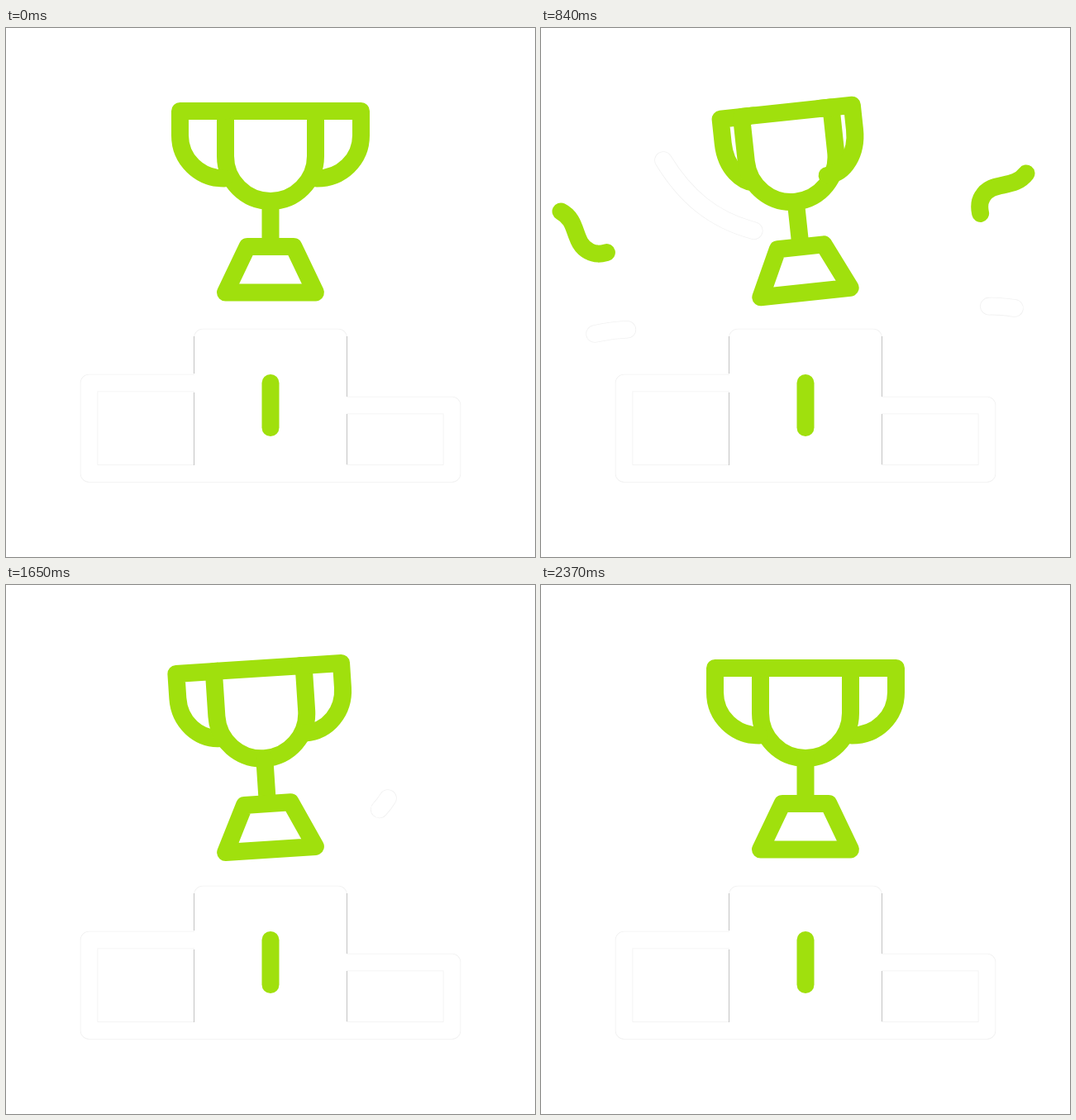
Recreate the animation shown at these times as an HTML page. Size 640 px wide and 640 px high, loop 2.4 s.

```html
<!DOCTYPE html>
<html lang="en">
<head>
<meta charset="utf-8">
<title>Trophy podium</title>
<style>
  html, body { margin: 0; height: 100%; overflow: hidden; background: #fff; }
  svg { display: block; width: 100vw; height: 100vh; }
  path { fill: none; stroke-linecap: round; stroke-linejoin: round; }
  .green { stroke: #a0e00d; stroke-width: 21; }
  .solid { fill: #fff; }
  .edge { stroke: #f1f1f1; stroke-width: 21.6; }
  .white { stroke: #fff; stroke-width: 20; }
  .hair { stroke: #c4c4c4; stroke-width: 1; stroke-linecap: butt; }
</style>
</head>
<body>
<svg viewBox="0 0 640 640">
  <defs>
    <path id="steps" d="M238 429.5H100.5V539H238M402 456.5H539.5V539H402M238 539V374.5H402V539Z"/>
  </defs>
  <use href="#steps" class="edge"/>
  <use href="#steps" class="white"/>
  <path class="solid" d="M238 374H402V539H238Z"/>
  <path class="hair" d="M227.5 373V418M227.5 441V529M412.5 373V446M412.5 467V528"/>
  <path class="green" d="M320 429.5V483.5"/>

  <g id="trophy">
    <path id="back" class="green"/>
    <path class="green solid" d="M265.5 100.5H374.5V155A54.5 54.5 0 0 1 265.5 155Z"/>
    <path id="front" class="green"/>
    <path class="green" d="M320 210V264"/>
    <path class="green solid" d="M292 264.5H348L374.5 320H265.5Z"/>
  </g>
  <g id="ribbons"></g>
</svg>
<script>
  const LOOP = 2400, STEP = 30;
  const $ = id => document.getElementById(id);

  // [time, degrees]
  const TILT = [[0, 0], [600, -13], [1200, 7], [1700, -4], [1980, 2], [2300, 0], [LOOP, 0]];
  const SPIN = [[0, 0], [420, 103], [600, 120], [840, 137], [1080, 190],
                [1320, 254], [1650, 336], [1830, 355], [2100, 360], [LOOP, 360]];

  // path, head start and end, tail start and end
  const RIBBONS = [
    ['green', 'M224 373C204 364 214 323 181 321C164 321 152 330 138 321C118 308 130 272 97 269C82 268 72 278 58 270C38 260 46 233 24 222', 60, 670, 450, 1060],
    ['green', 'M420 361C437 341 455 355 470 334C485 313 463 297 480 278C497 259 522 276 534 245C537 232 525 218 534 204C545 184 572 196 587 176', 60, 670, 450, 1060],
    ['white', 'M190 405C170 378 140 366 113 365C96 364 80 367 65 370', 60, 670, 450, 1060],
    ['white', 'M473 368C488 350 510 339 534 337C548 336 560 337 573 339', 60, 670, 450, 1060],
    ['white', 'M148 160C175 204 208 232 257 245C298 255 345 257 388 251C440 241 485 222 493 174', 600, 1200, 960, 1560],
    ['white', 'M205 268C246 290 296 301 348 299C374 298 398 296 420 290C440 284 452 274 462 258', 900, 1500, 860, 1800]
  ];

  const ease = (t, a, b) => {
    const p = Math.min(1, Math.max(0, (t - a) / (b - a)));
    return (1 - Math.cos(Math.PI * p)) / 2;
  };

  function swing(keys, t) {
    const i = keys.findIndex(k => k[0] > t);
    const [a, from] = keys[i - 1], [b, to] = keys[i];
    return from + (to - from) * ease(t, a, b);
  }

  // Smooth curve through rising keys, without overshoot
  function glide(keys, t) {
    const i = keys.findIndex(k => k[0] > t);
    const rate = j => (keys[j][1] - keys[j - 1][1]) / (keys[j][0] - keys[j - 1][0]);
    const slope = j => {
      if (j === 0 || j === keys.length - 1) return 0;
      const p = rate(j), q = rate(j + 1);
      return p + q ? 2 * p * q / (p + q) : 0;
    };
    const [a, y0] = keys[i - 1], [b, y1] = keys[i];
    const h = b - a, u = (t - a) / h, v = 1 - u;
    return y0 * v * v * (1 + 2 * u) + y1 * u * u * (3 - 2 * u)
         + h * u * v * (slope(i - 1) * v - slope(i) * u);
  }

  function handle(k) {
    const x = r => (320 + r * k).toFixed(2);
    return `M${x(54.5)} 100.5H${x(109.5)}V130C${x(109.5)} 159 ${x(86)} 182 ${x(56)} 182`;
  }

  function addPath(cls, d) {
    const p = document.createElementNS('http://www.w3.org/2000/svg', 'path');
    p.setAttribute('class', cls);
    p.setAttribute('d', d);
    p.setAttribute('pathLength', 1);
    return $('ribbons').appendChild(p);
  }

  const ribbons = RIBBONS.map(([color, d, ...times]) => ({
    times,
    paths: (color === 'white' ? ['edge', 'white'] : [color]).map(c => addPath(c, d))
  }));

  function draw(t) {
    const turn = glide(SPIN, t) % 180 * Math.PI / 180;
    $('trophy').setAttribute('transform', `rotate(${swing(TILT, t)} 320 320)`);
    $('front').setAttribute('d', handle(-Math.cos(turn)));
    $('back').setAttribute('d', handle(Math.cos(turn)));

    for (const { times: [h0, h1, t0, t1], paths } of ribbons) {
      const head = ease(t, h0, h1), tail = ease(t, t0, t1);
      for (const p of paths) {
        p.style.display = head > tail ? '' : 'none';
        p.style.strokeDasharray = `${Math.max(0, head - tail)} 3`;
        p.style.strokeDashoffset = -tail;
      }
    }
  }

  const start = performance.now();
  function tick() {
    const t = (performance.now() - start) % LOOP;
    draw(Math.floor(t / STEP) * STEP);
    requestAnimationFrame(tick);
  }
  tick();
</script>
</body>
</html>
```
